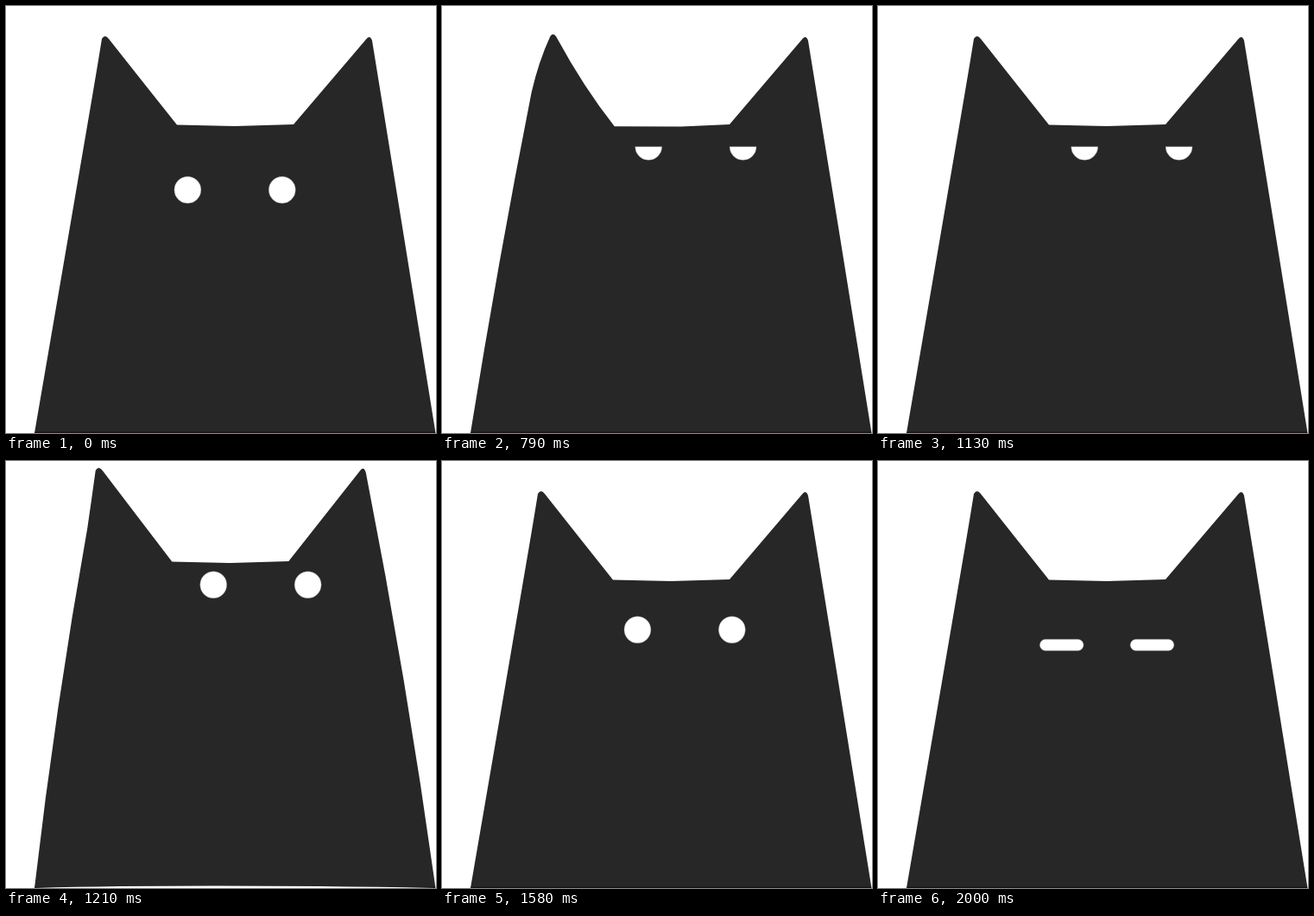
An HTML page with a canvas for the animation above (2120 ms loop, 498 by 494 pixels).

```html
<!DOCTYPE html>
<html lang="en">
<head>
<meta charset="utf-8">
<title>Cat</title>
<style>
  html, body { margin: 0; width: 100%; height: 100%; overflow: hidden; background: #fff; }
  canvas { display: block; }
</style>
</head>
<body>
<canvas id="stage" width="498" height="494"></canvas>
<script>
const ctx = document.getElementById('stage').getContext('2d');
const LOOP = 2120, FPS = 24, FLOOR = 494;
const LEFT = 210.4, GAP = 109.4, EYE_Y = 212.8, R = 15.5;

function drawBody(bend, rise) {
  const k = rise / 457;
  const bulge = 4 * bend + rise / 4;
  // Key point that moves by (dx, dy) when the left ear is folded
  const key = (x, y, dx, dy) => [x + dx * bend, y + dy * bend];
  const curve = (control, end) => ctx.quadraticCurveTo(...control, ...end);

  ctx.save();
  // Stretch and lean upwards from the floor
  ctx.transform(1, 0, 0.27 * k, 1 + k, -0.27 * k * FLOOR, -k * FLOOR);
  ctx.beginPath();
  ctx.moveTo(33, FLOOR);
  curve([67 - bulge, 297], key(100.7, 100, 5, 0));
  curve(key(106, 69, 10, -8), key(111, 38, 24.5, -5));
  curve(key(114.5, 32, 25, -4), key(119, 38, 24.5, -1));
  curve(key(158.5, 88, 9.5, 10), key(198, 137.5, 3, 3));
  ctx.lineTo(...key(265, 139, 20, 1));
  ctx.lineTo(333, 137);
  ctx.lineTo(417.5, 38);
  curve([421.5, 33], [424, 40]);
  curve([461 + rise / 4, 267], [497.5, FLOOR]);
  curve([220, FLOOR - rise / 6], [33, FLOOR]);
  ctx.fillStyle = '#272727';
  ctx.fill();
  ctx.restore();

  // Dark bottom row, only on the body
  ctx.globalCompositeOperation = 'source-atop';
  ctx.fillStyle = '#1b1017';
  ctx.fillRect(0, FLOOR - 1.5, 498, 1.5);
  ctx.globalCompositeOperation = 'source-over';
}

function drawEyes(kind, dx, dy) {
  const y = EYE_Y + dy;
  ctx.beginPath();
  for (const side of [0, 1]) {
    const x = LEFT + GAP * side + dx;
    if (kind === 'shut') {
      ctx.roundRect(x + 2.3 - 4.6 * side - 25.4, y - 6.6, 50.8, 13.2, 6.6);
    } else {
      ctx.moveTo(x + R, y);
      ctx.arc(x, y, R, 0, Math.PI * (kind === 'half' ? 1 : 2));
      ctx.closePath();
    }
  }
  ctx.fillStyle = '#fff';
  ctx.fill();
  ctx.strokeStyle = '#8886';
  ctx.stroke();
}

function draw(t) {
  const f = Math.floor((t + 5) * FPS / 1000);
  let kind = 'open', dx = 0, dy = 0, bend = 0, rise = 0;

  if (f >= 13 && f < 18) {            // glance up, then blink
    const k = f === 13 ? 0.5 : 1;
    dx = 29 * k;
    dy = -39 * k;
    if (k === 1) kind = 'shut';
  } else if (f >= 18 && f < 28) {     // sleepy look, ear twitch
    kind = 'half';
    dx = 28.8;
    dy = -50;
    bend = Math.sin(Math.PI * (f - 17) / 10);
  } else if (f >= 28 && f < 42) {     // startle, settle, look back
    rise = f === 28 ? 14 : Math.max(0, 27 - 7 * (f - 29));
    const k = f < 38 ? 1 : Math.pow(1 - (f - 37) / 4, 2.4);
    dx = 32 * k - rise * 0.08;
    dy = -35 * k - rise * 1.28;
  } else if (f >= 48) {
    kind = 'shut';
  }

  ctx.clearRect(0, 0, 498, 494);
  drawBody(bend, rise);
  drawEyes(kind, dx, dy);
}

const start = performance.now();
function tick() {
  draw((performance.now() - start) % LOOP);
  requestAnimationFrame(tick);
}
tick();
</script>
</body>
</html>
```
